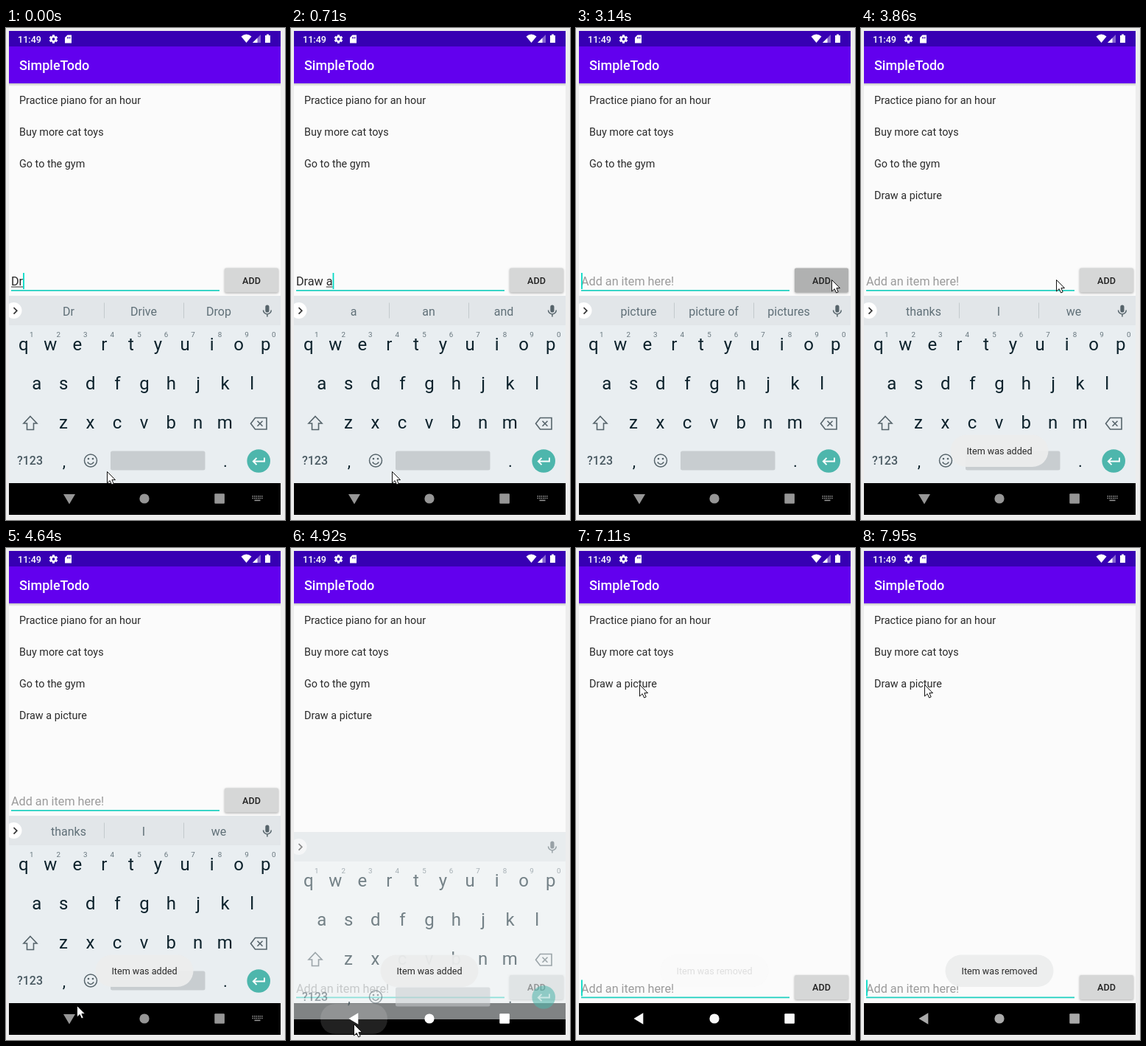
Animation, 379 px wide and 667 px high, one loop 8 s. Source, as an HTML page with a canvas:

```html
<!DOCTYPE html>
<html lang="en">
<head>
<meta charset="utf-8">
<title>Todo list</title>
<style>
html, body { margin: 0; width: 100%; height: 100%; overflow: hidden; background: #ededed; }
canvas { display: block; }
</style>
</head>
<body>
<canvas id="stage" width="379" height="667"></canvas>
<script>
const ctx = document.getElementById('stage').getContext('2d');
const LOOP = 8000;
const TEAL = '#03dac5', INK = '#2a2a2a', KEY = '#0d222c', ICON = '#56646b';

// Runs of evenly spaced screen updates: start, end, count
const RUNS = [[0, 0, 1], [120, 1020, 7], [1170, 1170, 1], [1750, 2710, 8], [2830, 2830, 1],
  [3140, 3570, 4], [3860, 4770, 8], [4920, 5070, 2], [5370, 6350, 8], [6500, 6500, 1],
  [7110, 7530, 4], [7830, 7950, 2]];
const UPDATES = RUNS.flatMap(([a, b, n]) =>
  Array.from({ length: n }, (_, i) => n > 1 ? a + Math.round((b - a) * i / (n - 1) / 10) * 10 : a));

// Time, typed text, start of the underlined word, suggestions
const TYPING = [
  [0, 'Dr', 0, 'Dr,Drive,Drop'],
  [120, 'Dra', 0, 'Dra,Drag,Drama'],
  [270, 'Draw', 0, 'Draw,Drawing,Drawn'],
  [420, 'Draw ', 5, 'the,a,on'],
  [570, 'Draw a', 5, 'a,an,and'],
  [720, 'Draw a ', 7, 'picture,line,few'],
  [870, 'Draw a pi', 7, 'pi,*pic,picture'],
  [1020, 'Draw a pict', 7, 'pict,*picture,picture of'],
  [1170, 'Draw a pictu', 7, 'pictu,*picture,picture of'],
  [1750, 'Draw a pictur', 7, 'pictur,*picture,picture of'],
  [1890, 'Draw a picture', 7, 'picture,picture of,pictures'],
  [3140, '', 0, 'picture,picture of,pictures'],
  [3290, '', 0, 'thanks,I,we']
];

const POINTER = [[1750, 137, 601], [2100, 200, 500], [2560, 347, 341], [3600, 347, 341],
  [3860, 265, 341], [4250, 170, 460], [4700, 85, 645], [5250, 85, 645], [5650, 84, 387],
  [6210, 86, 185]];

const clamp = v => Math.max(0, Math.min(1, v));
const ramp = (t, a, b) => clamp((t - a) / (b - a));
const at = (list, t) => list.filter(e => e[0] <= t).pop();

function pointerAt(t) {
  const i = POINTER.findIndex(p => p[0] > t);
  if (i === 0) return POINTER[0].slice(1);
  if (i < 0) return POINTER[POINTER.length - 1].slice(1);
  const [a, b] = [POINTER[i - 1], POINTER[i]];
  const k = ramp(t, a[0], b[0]);
  return [a[1] + (b[1] - a[1]) * k, a[2] + (b[2] - a[2]) * k];
}

function rect(x, y, w, h, color, r = 0) {
  ctx.fillStyle = color;
  ctx.beginPath();
  ctx.roundRect(x, y, w, h, r);
  ctx.fill();
}

function disc(x, y, r, color) {
  ctx.fillStyle = color;
  ctx.beginPath();
  ctx.arc(x, y, r, 0, 7);
  ctx.fill();
}

function text(s, x, y, size, color, align = 'left', weight = 400) {
  ctx.font = `${weight} ${size}px Roboto, sans-serif`;
  ctx.textAlign = align;
  ctx.fillStyle = color;
  ctx.fillText(s, x, y);
}

function shape(d, color, x = 0, y = 0) {
  ctx.save();
  ctx.translate(x, y);
  ctx.fillStyle = color;
  ctx.fill(new Path2D(d));
  ctx.restore();
}

function line(d, color, width, x = 0, y = 0) {
  ctx.save();
  ctx.translate(x, y);
  ctx.strokeStyle = color;
  ctx.lineWidth = width;
  ctx.stroke(new Path2D(d));
  ctx.restore();
}

function withAlpha(a, draw) {
  ctx.save();
  ctx.globalAlpha *= a;
  draw();
  ctx.restore();
}

function header() {
  rect(4, 25, 369, 50, '#6200ee');
  const shade = ctx.createLinearGradient(0, 75, 0, 79);
  shade.addColorStop(0, 'rgba(0,0,0,.22)');
  shade.addColorStop(1, 'rgba(0,0,0,0)');
  rect(4, 75, 369, 4, shade);
  rect(4, 4, 369, 21, '#3700b3');
  text('SimpleTodo', 18, 57, 18, '#fff', 'left', 500);
  text('11:49', 16, 19.5, 12.6, '#fff', 'left', 500);
  // Gear
  for (let i = 0; i < 3; i++) {
    ctx.save();
    ctx.translate(64.5, 15);
    ctx.rotate(i * Math.PI / 3);
    rect(-1.6, -5.8, 3.2, 11.6, '#fff', 0.5);
    ctx.restore();
  }
  disc(64.5, 15, 4.3, '#fff');
  disc(64.5, 15, 1.9, '#3700b3');
  // Memory card
  shape('M3.5 0H9V11H0V3.5Z', '#fff', 80, 9.5);
  line('M3.5 2.5V5M5.3 2.5V5M7.1 2.5V5', '#3700b3', 0.9, 80, 9.5);
  // Wifi, signal, battery
  shape('M0 3Q7 -3 14 3L7 11.5Z', '#fff', 319.5, 8.5);
  shape('M0 11L11 0V11Z', 'rgba(255,255,255,.4)', 335, 9);
  shape('M0 11L6.5 4.5V11Z', '#fff', 335, 9);
  shape('M0 1.5H2V0H5V1.5H7V11.5H0Z', '#fff', 352, 8.5);
}

function inputBar(t, dy) {
  const [, typed, mark] = at(TYPING, t);
  const pressed = 1 - ramp(t, 3140, 3500);
  ctx.save();
  ctx.translate(0, dy);
  const size = 16.2;
  text(typed || 'Add an item here!', 7, 349, size, typed ? INK : '#9b9b9b');
  ctx.font = `400 ${size}px Roboto, sans-serif`;
  const end = 7 + ctx.measureText(typed).width;
  const start = 7 + ctx.measureText(typed.slice(0, mark)).width;
  if (end > start) rect(start, 350.5, end - start, 1, INK);
  rect(7, 355, 283, 1.7, '#1fd0c0');
  const shown = t < 3140 ? t < 2390 || t >= 2800 : Math.floor((t + 50) / 500) % 2 === 0;
  if (shown) rect(end, 332, 1.8, 22, TEAL);

  ctx.save();
  ctx.shadowColor = 'rgba(0,0,0,.32)';
  ctx.shadowBlur = 3;
  ctx.shadowOffsetY = 1;
  const shade = t >= 3140 ? Math.round(214 - 38 * pressed) : 214;
  rect(297, 325.5, 73, 33, `rgb(${shade},${shade + 1},${shade + 1})`, 2);
  ctx.restore();
  text('ADD', 333.5, 346.8, 12.6, '#222', 'center', 500);
  ctx.restore();
}

function keyboard(suggestions) {
  rect(4, 363, 369, 254, '#e9eef1');
  rect(4, 363, 369, 40, '#e2e6e9');
  ctx.save();
  ctx.beginPath();
  ctx.rect(4, 363, 369, 40);
  ctx.clip();
  disc(10.5, 383, 11, '#fff');
  ctx.restore();
  line('M10.5 379L14.8 383.3L10.5 387.6', '#333', 1.7);
  if (suggestions) {
    suggestions.split(',').forEach((s, i) => {
      const bold = s[0] === '*';
      text(bold ? s.slice(1) : s, 85 + i * 102, 389.5, 16, bold ? '#101b20' : '#607078', 'center', bold ? 700 : 400);
    });
    rect(133, 372.5, 1, 21, '#c3c9cc');
    rect(241, 372.5, 1, 21, '#c3c9cc');
  }
  // Microphone
  rect(352.3, 375.5, 5.2, 10, ICON, 2.6);
  line('M349.5 382.5a5.4 5.4 0 0 0 10.8 0M354.9 388V391.5', ICON, 1.5);

  ['qwertyuiop', 'asdfghjkl', 'zxcvbnm'].forEach((row, r) => {
    [...row].forEach((c, i) => {
      const x = [23.7, 41.7, 78][r] + i * 36.55;
      text(c, x, 437 + r * 53, 24, KEY, 'center');
      if (!r) text((i + 1) % 10, x + 11, 419, 9.8, '#66757d', 'center');
    });
  });
  line('M33 526.5L42 536H37.5V544.5H28.5V536H24Z', ICON, 1.6);
  line('M338.5 528.5H354V544H338.5L332.5 536.2ZM341.5 532.7L348.5 539.7M348.5 532.7L341.5 539.7', ICON, 1.6);

  text('?123', 32.5, 592, 16, '#4a5a62', 'center', 500);
  text(',', 79, 594.5, 22, KEY, 'center');
  text('.', 298, 594.5, 22, KEY, 'center');
  line('M123.5 586.5a8.5 8.5 0 1 1 -17 0a8.5 8.5 0 1 1 17 0M110.7 588.5Q115 594.5 119.3 588.5', ICON, 1.5);
  disc(112, 584, 1.3, ICON);
  disc(118, 584, 1.3, ICON);
  rect(142, 573.5, 128.5, 26, '#c8cdd0', 2.5);
  disc(343.2, 587, 15.8, '#4db6ac');
  line('M351 582.5V587.5H336M340.5 582.8L335.8 587.5L340.5 592.2', '#fff', 1.9);
}

function navIcons(t) {
  const typing = t < 4920;
  const v = typing ? 150 : Math.round(255 - 85 * ramp(t, 7050, 7900));
  const color = `rgb(${v},${v},${v})`;
  shape(typing ? 'M78 632H94L86 645.5Z' : 'M91.3 630.2V645.8L78.5 638Z', color);
  disc(188, 638, 6.6, color);
  rect(283.3, 631.2, 13.6, 13.6, color, 1);
  if (!typing) return;
  for (let r = 0; r < 2; r++)
    for (let i = 0; i < 6; i++) rect(334.5 + i * 2.5, 634 + r * 2.7, 1.5, 1.6, color);
  rect(337.5, 639.7, 8, 1.5, color);
}

function ripple(t) {
  const a = t >= 4770 ? 1 - ramp(t, 4950, 5500) : 0;
  if (!a) return;
  const w = t < 4900 ? 50 : 91;
  rect(85.5 - w / 2, 618, w, 41, `rgba(255,255,255,${0.13 * a})`, 20);
}

function toast(message, width, alpha) {
  if (alpha <= 0) return;
  withAlpha(alpha, () => {
    rect(188 - width / 2, 551.5, width, 43.5, 'rgba(236,237,237,.94)', 21.7);
    text(message, 188, 577.8, 12.6, '#2a2a2a', 'center');
  });
}

function pointer(t) {
  const [x, y] = pointerAt(t).map(Math.round);
  const arrow = 'M.5 .5V16L4.2 12.6L6.6 18L9.2 16.9L6.9 11.6H11.5Z';
  shape(arrow, '#fff', x, y);
  line(arrow, '#111', 1, x, y);
}

function draw(t) {
  rect(0, 0, 379, 667, '#ededed');
  rect(4, 4, 369, 656, '#fbfbfb');
  header();

  const items = ['Practice piano for an hour', 'Buy more cat toys', 'Go to the gym'];
  if (t >= 3290) items.push('Draw a picture');
  if (t >= 7110) items.splice(2, 1);
  items.forEach((s, i) => text(s, 18, 102.5 + i * 43, 14.4, INK));

  inputBar(t, t < 4920 ? 0 : 253.5);
  rect(4, 617, 369, 43, '#000');
  if (t < 4920) keyboard(at(TYPING, t)[3]);
  else if (t < 5070) {
    withAlpha(0.55, () => {
      ctx.translate(0, 22);
      keyboard('');
    });
  }
  ripple(t);
  navIcons(t);
  toast('Item was added', 133, ramp(t, 3250, 3600) - ramp(t, 5250, 5560));
  toast('Item was removed', 147, ramp(t, 7050, 7500));
  pointer(t);
}

function tick(now) {
  const t = now % LOOP;
  draw(UPDATES.filter(u => u <= t).pop());
  requestAnimationFrame(tick);
}
requestAnimationFrame(tick);
</script>
</body>
</html>
```
